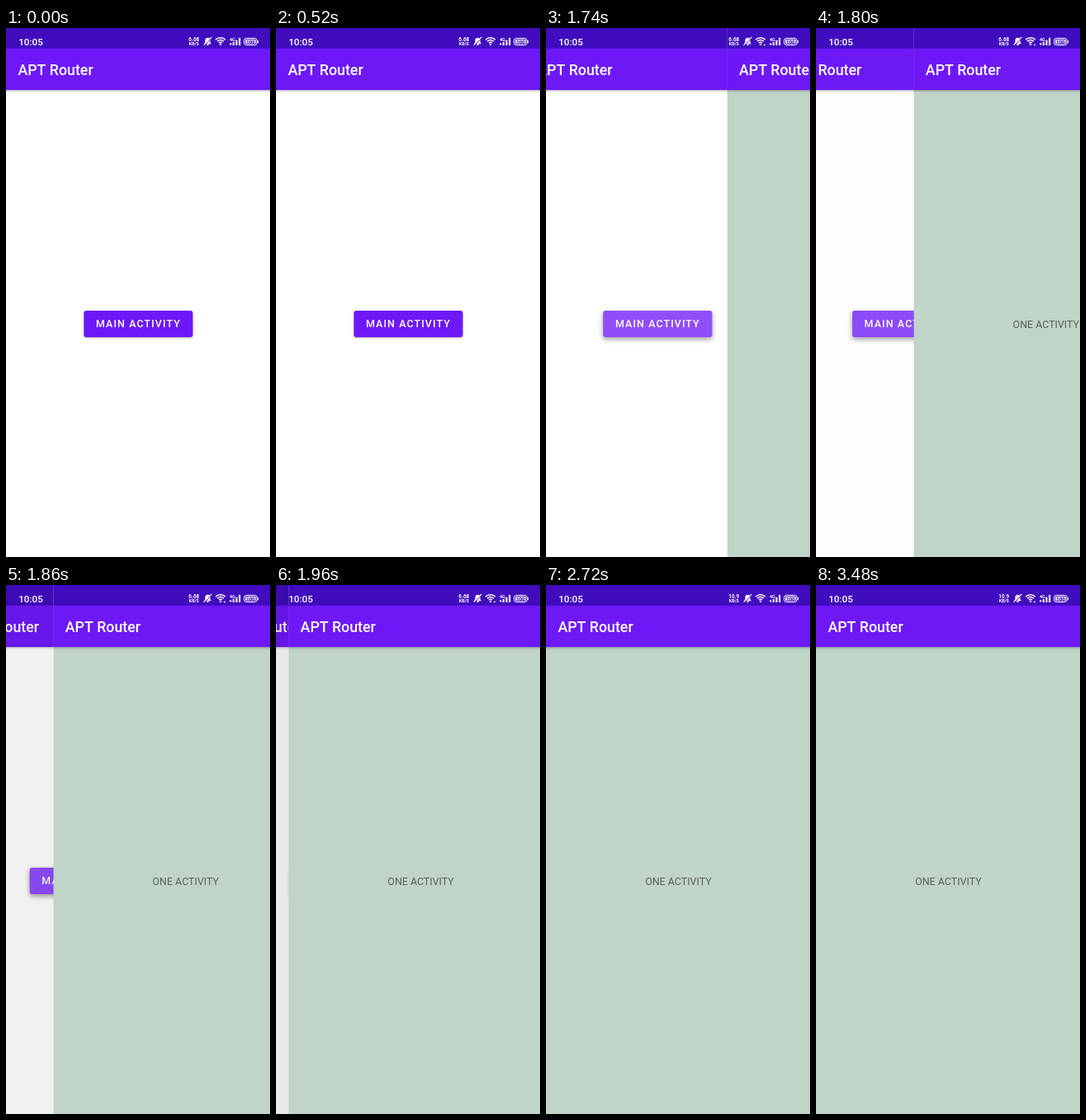
Write an HTML page with a canvas that moves like this. It is 320 by 640 pixels and loops after 3.84 s.

```html
<!DOCTYPE html>
<html lang="en">
<head>
<meta charset="utf-8">
<title>APT Router</title>
<style>
html, body { margin: 0; width: 100%; height: 100%; overflow: hidden; background: #fff; }
canvas { display: block; width: 320px; height: 640px; }
</style>
</head>
<body>
<canvas id="stage"></canvas>
<script>
const W = 320, H = 640, LOOP = 3840;
const PRESS = 1520, SLIDE = 1673, SETTLED = 2140;
const PURPLE = '#6e18f8', DARK = '#400cbe', SAGE = '#c0d4c8';
const FONT = 'Roboto, "Noto Sans", sans-serif';

const canvas = document.getElementById('stage');
const ctx = canvas.getContext('2d');
const ratio = window.devicePixelRatio || 1;
canvas.width = W * ratio;
canvas.height = H * ratio;

const clamp = v => Math.max(0, Math.min(1, v));

// Critically damped spring, 0 to 1
function slideProgress(t) {
  if (t < SLIDE) return 0;
  if (t >= SETTLED) return 1;
  const k = (t - SLIDE) * 0.0167;
  return 1 - (1 + k) * Math.exp(-k);
}

function text(str, x, y, size, weight, color, align = 'left', spacing = 0) {
  ctx.font = `${weight} ${size}px ${FONT}`;
  ctx.textAlign = align;
  ctx.letterSpacing = spacing + 'px';
  ctx.fillStyle = color;
  ctx.fillText(str, x, y);
}

function rect(x, y, w, h, color) {
  ctx.fillStyle = color;
  ctx.fillRect(x, y, w, h);
}

function round(x, y, w, h, r) {
  ctx.beginPath();
  ctx.roundRect(x, y, w, h, r);
}

function shadow(alpha, blur, dy) {
  ctx.shadowColor = `rgba(0,0,0,${alpha})`;
  ctx.shadowBlur = blur * ratio;
  ctx.shadowOffsetY = dy * ratio;
}

function page(x, background, content) {
  ctx.save();
  ctx.translate(x, 0);
  ctx.beginPath();
  ctx.rect(0, 0, W, H);
  ctx.clip();
  rect(0, 0, W, H, background);
  content();
  ctx.save();
  shadow(0.32, 3, 1);
  rect(-4, 25, W + 8, 50, PURPLE);
  ctx.restore();
  rect(0, 0, W, 25, DARK);
  text('APT Router', 14.4, 57, 17.8, 500, '#fff');
  ctx.restore();
}

function button(t) {
  const held = t >= PRESS;
  const lift = clamp((t - PRESS) / 120);
  ctx.save();
  shadow(0.34 + lift * 0.06, 2.5 + lift * 4, 1 + lift * 1.6);
  ctx.fillStyle = PURPLE;
  round(94.4, 342, 132, 32, 3);
  ctx.fill();
  ctx.restore();
  if (held) {
    ctx.fillStyle = `rgba(255,255,255,${0.28 - 0.06 * clamp((t - PRESS) / 280)})`;
    round(94.4, 342, 132, 32, 3);
    ctx.fill();
  }
  text('MAIN ACTIVITY', 109, 362.4, 12.44, 500, '#fff', 'left', 1.11);
}

function bell() {
  ctx.save();
  ctx.fillStyle = '#fff';
  ctx.beginPath();
  ctx.moveTo(240, 19.2);
  ctx.lineTo(241.4, 17.4);
  ctx.lineTo(241.4, 15);
  ctx.bezierCurveTo(241.4, 10.6, 247.6, 10.6, 247.6, 15);
  ctx.lineTo(247.6, 17.4);
  ctx.lineTo(249, 19.2);
  ctx.closePath();
  ctx.fill();
  ctx.beginPath();
  ctx.arc(244.5, 19.6, 1.5, 0, Math.PI);
  ctx.fill();
  line(240.4, 21.2, 250, 11.2, 1.2, DARK);
  line(239.6, 20.6, 249.4, 10.9, 1.2, '#fff');
  ctx.restore();
}

function line(x1, y1, x2, y2, width, color) {
  ctx.strokeStyle = color;
  ctx.lineWidth = width;
  ctx.beginPath();
  ctx.moveTo(x1, y1);
  ctx.lineTo(x2, y2);
  ctx.stroke();
}

function wifi(active) {
  ctx.strokeStyle = ctx.fillStyle = '#fff';
  ctx.lineWidth = 1.5;
  for (const r of [8.3, 5.5, 2.8]) {
    ctx.beginPath();
    ctx.arc(260, 20, r, -Math.PI * 0.75, -Math.PI * 0.25);
    ctx.stroke();
  }
  ctx.beginPath();
  ctx.arc(260, 19.9, 1.2, 0, Math.PI * 2);
  ctx.fill();
  if (active) {
    ctx.beginPath();
    ctx.moveTo(263.5, 19.7);
    ctx.lineTo(266.3, 19.7);
    ctx.lineTo(264.9, 21.7);
    ctx.fill();
  }
}

function signal() {
  text('4G', 271, 16, 5.4, 700, '#fff');
  ctx.beginPath();
  ctx.moveTo(270.8, 19.4);
  ctx.lineTo(272.2, 17.8);
  ctx.lineTo(273.6, 19.4);
  ctx.lineTo(272.2, 21);
  ctx.fill();
  [4, 6.3, 9.2].forEach((h, i) => {
    round(274.7 + i * 3.7, 21 - h, 2.1, h, 0.6);
    ctx.fill();
  });
}

function battery() {
  ctx.strokeStyle = '#fff';
  ctx.lineWidth = 1;
  round(288.6, 12.4, 15.6, 8.2, 2.8);
  ctx.stroke();
  ctx.fillStyle = 'rgba(255,255,255,.82)';
  round(290, 13.8, 12.8, 5.4, 1.4);
  ctx.fill();
  ctx.fillStyle = '#fff';
  round(304.7, 14.7, 1.2, 3.6, 0.6);
  ctx.fill();
  text('100', 296.4, 18.6, 6, 700, DARK, 'center');
}

function statusBar(t) {
  text('10:05', 15.2, 20.6, 11.7, 500, '#fff');
  text(t < 2680 ? '6.68' : '10.9', 227.8, 16.2, 6.4, 600, '#fff', 'center');
  text('KB/S', 227.8, 21.3, 5.4, 600, '#fff', 'center');
  bell();
  wifi((t >= 840 && t < 2360) || t >= 3480);
  signal();
  battery();
}

function draw(t) {
  const p = slideProgress(t);
  ctx.setTransform(ratio, 0, 0, ratio, 0, 0);
  if (p < 1) {
    page(-80 * p, '#fff', () => button(t));
    const dim = 0.1 * clamp((p - 0.6) / 0.4);
    if (dim) rect(0, 0, W, H, `rgba(0,0,0,${dim})`);
  }
  if (p > 0) {
    page(W * (1 - p), SAGE, () =>
      text('ONE ACTIVITY', 160.4, 362.6, 12.44, 400, 'rgba(0,0,0,.54)', 'center'));
  }
  statusBar(t);
}

const start = performance.now();
function tick() {
  draw((performance.now() - start) % LOOP);
  requestAnimationFrame(tick);
}
tick();
</script>
</body>
</html>
```
